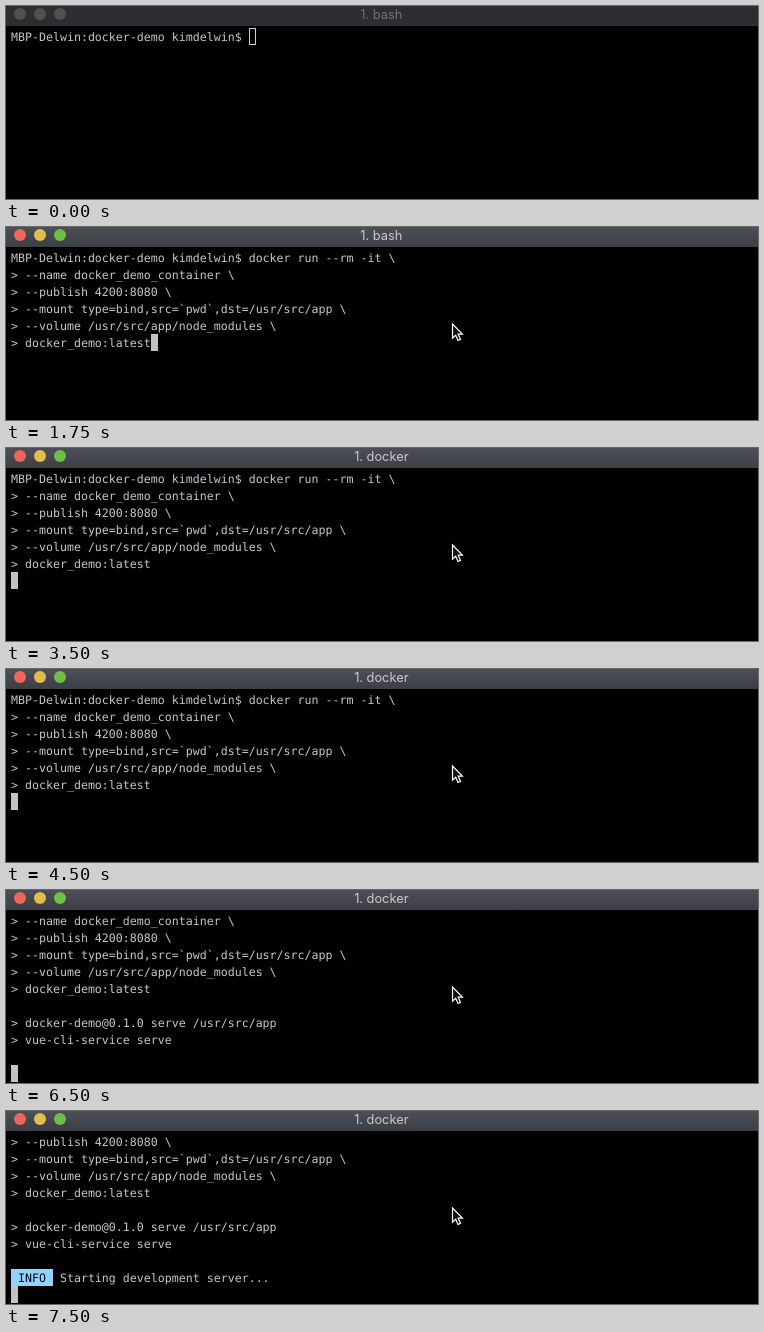
Recreate the animation shown at these times as an HTML page. Size 752x193 px, loop 8 s.

```html
<!DOCTYPE html>
<html lang="en">
<head>
<meta charset="utf-8">
<title>Terminal</title>
<style>
  html, body { margin: 0; width: 100%; height: 100%; overflow: hidden; background: #000; }
  svg { display: block; }
  text { white-space: pre; }
  .line { font: 11.627px "DejaVu Sans Mono", monospace; fill: #c7c7c7; text-rendering: geometricPrecision; }
  .title { font: 12.8px Inter, sans-serif; text-anchor: middle; }
</style>
</head>
<body>
<svg width="752" height="193" viewBox="0 0 752 193">
  <defs>
    <linearGradient id="active" x2="0" y2="1">
      <stop stop-color="#4d4f58"/>
      <stop offset="1" stop-color="#3d3f46"/>
    </linearGradient>
  </defs>
  <rect width="752" height="193"/>
  <rect id="bar" width="752" height="20"/>
  <g id="lights">
    <circle cx="14" cy="8" r="6"/>
    <circle cx="34" cy="8" r="6"/>
    <circle cx="54" cy="8" r="6"/>
  </g>
  <text id="title" class="title" x="375.3" y="13"></text>
  <rect id="badge" x="5" y="158" width="42" height="17" fill="#8fd5ff"/>
  <g id="lines"></g>
  <rect id="caret"/>
  <path id="pointer" d="M446.5 97v14.2l3.2-3 2.3 5.3 2.5-1.1-2.3-5.2h4.2z" fill="#111" stroke="#fff" stroke-width="1.2"/>
</svg>
<script>
const LOOP = 8000, LEFT = 5, TOP = 22, CELL = 7, ROW = 17;
const $ = id => document.getElementById(id);

const prompt = "MBP-Delwin:docker-demo kimdelwin$ ";
const command = [
  prompt + "docker run --rm -it \\",
  "> --name docker_demo_container \\",
  "> --publish 4200:8080 \\",
  "> --mount type=bind,src=`pwd`,dst=/usr/src/app \\",
  "> --volume /usr/src/app/node_modules \\",
  "> docker_demo:latest"
];
const serve = [...command, "", "> docker-demo@0.1.0 serve /usr/src/app", "> vue-cli-service serve", ""];
const info = [...serve, " INFO  Starting development server..."];

// Each step changes part of the state and keeps the rest.
const steps = [
  { at: 0, lines: [prompt], caret: [34, 0], focus: false, pointer: false, title: "1. bash", badge: false },
  { at: 500, pointer: true },
  { at: 750, focus: true },
  { at: 1750, lines: command, caret: [20, 5] },
  { at: 3000, caret: [0, 6] },
  { at: 3500, title: "1. docker" },
  { at: 6500, lines: serve.slice(1), caret: [0, 9] },
  { at: 6750, lines: info.slice(2), badge: true }
];

const rows = Array.from({ length: 10 }, (_, i) => {
  const row = document.createElementNS("http://www.w3.org/2000/svg", "text");
  row.setAttribute("class", "line");
  row.setAttribute("x", LEFT);
  row.setAttribute("y", TOP + 13 + i * ROW);
  return $("lines").appendChild(row);
});

function set(el, attrs) {
  for (const name in attrs) el.setAttribute(name, attrs[name]);
}

function draw({ lines, caret: [col, row], focus, pointer, title, badge }) {
  rows.forEach((el, i) => { el.textContent = lines[i] || ""; });
  if (badge) {
    const label = document.createElementNS("http://www.w3.org/2000/svg", "tspan");
    label.textContent = " INFO ";
    label.setAttribute("fill", "#000");
    rows[8].textContent = rows[8].textContent.slice(6);
    rows[8].prepend(label);
  }
  const inset = focus ? 0 : 0.5;
  set($("caret"), {
    x: LEFT + col * CELL + inset, y: TOP + row * ROW + inset,
    width: CELL - 2 * inset, height: ROW - 2 * inset,
    fill: focus ? "#c2c2c2" : "none", stroke: focus ? "none" : "#d0d0d0"
  });
  set($("bar"), { fill: focus ? "url(#active)" : "#2d2e31" });
  set($("title"), { fill: focus ? "#c9cacd" : "#717275" });
  $("title").textContent = title;
  const colors = focus ? ["#f0655a", "#e3bd4c", "#6fbe46"] : Array(3).fill("#505153");
  [...$("lights").children].forEach((el, i) => set(el, { fill: colors[i] }));
  set($("pointer"), { visibility: pointer ? "visible" : "hidden" });
  set($("badge"), { visibility: badge ? "visible" : "hidden" });
}

const start = performance.now();
let shown = -1;

function tick() {
  const time = Math.max(0, performance.now() - start) % LOOP;
  const count = steps.filter(step => step.at <= time).length;
  if (count !== shown) {
    shown = count;
    draw(Object.assign({}, ...steps.slice(0, count)));
  }
  requestAnimationFrame(tick);
}
tick();
</script>
</body>
</html>
```
